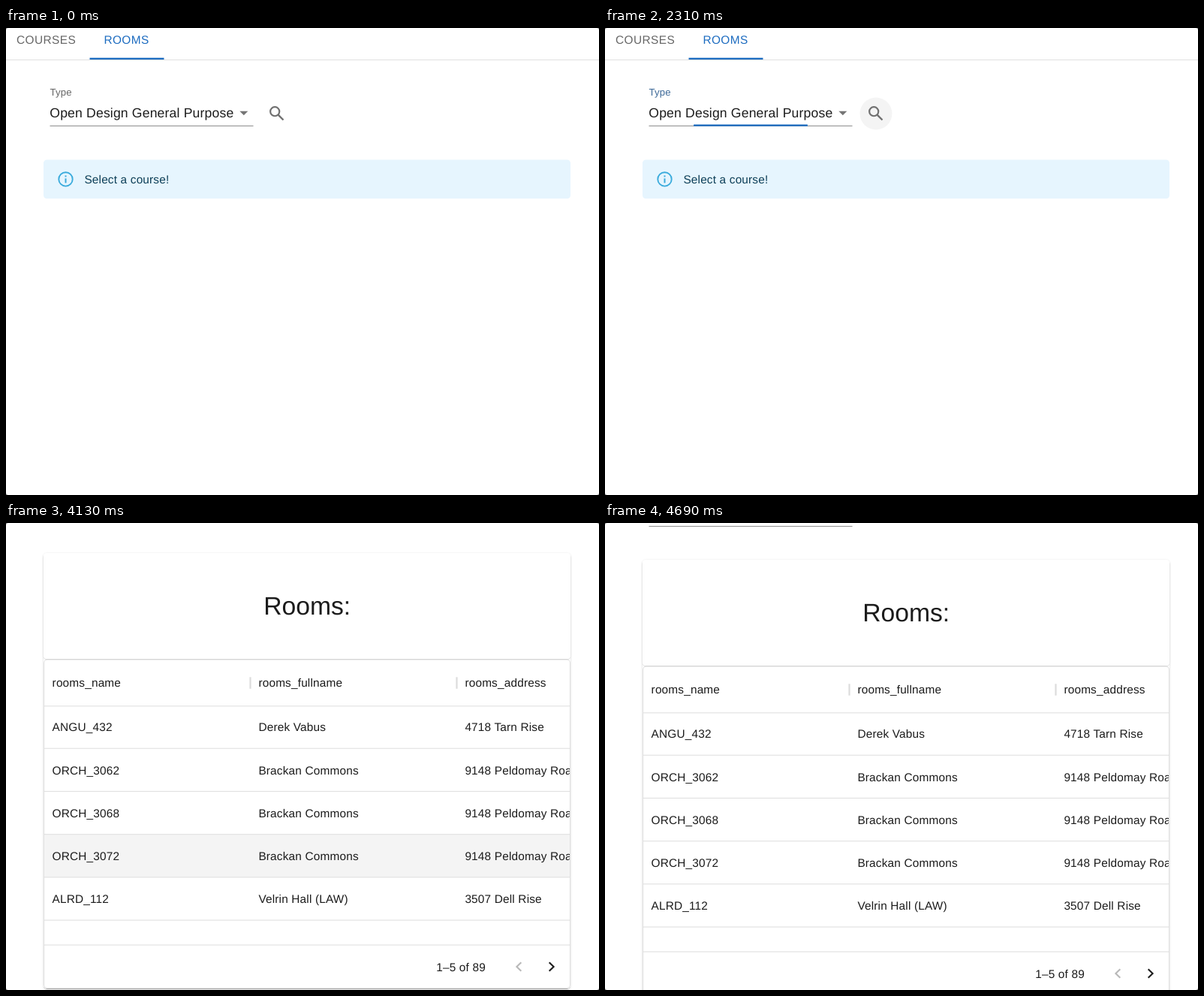
Animation, 790 px wide and 622 px high, one loop 5.04 s. Source, as an HTML page with a canvas:

```html
<!DOCTYPE html>
<html lang="en">
<head>
<meta charset="utf-8">
<title>Rooms</title>
<style>
  html, body { margin: 0; width: 100%; height: 100%; overflow: hidden; background: #fff; }
  canvas { display: block; }
</style>
</head>
<body>
<canvas id="stage" width="790" height="622"></canvas>
<script>
const ctx = document.getElementById('stage').getContext('2d');
const W = 790, H = 622, LOOP = 5040, STEP = 70;
const BLUE = [29, 108, 192], GREY = [102, 102, 102], INK = '#1c1c1c', LINE = '#e0e0e0';
const LEFT = 50, RIGHT = 752, COLUMNS = [61.6, 336.4, 611.4];
const HEADERS = ['rooms_name', 'rooms_fullname', 'rooms_address'];
const ROOMS = [
  ['ANGU_432', 'Derek Vabus', '4718 Tarn Rise'],
  ['ORCH_3062', 'Brackan Commons', '9148 Peldomay Road'],
  ['ORCH_3068', 'Brackan Commons', '9148 Peldomay Road'],
  ['ORCH_3072', 'Brackan Commons', '9148 Peldomay Road'],
  ['ALRD_112', 'Velrin Hall (LAW)', '3507 Dell Rise']
];

const clamp = v => Math.max(0, Math.min(1, v));
const rgb = c => `rgb(${c.join()})`;
const mix = (a, b, k) => rgb(a.map((v, i) => Math.round(v + (b[i] - v) * k)));
const rowLine = i => i ? 378 + 57.2 * i : 378.8;

function text(str, x, y, size = 15.4, color = INK, spacing = 0.0107) {
  ctx.font = `${size}px "Liberation Sans", Arial, sans-serif`;
  ctx.letterSpacing = `${size * spacing}px`;
  ctx.fillStyle = color;
  ctx.fillText(str, x, y);
}

function box(x, y, w, h, color) {
  ctx.fillStyle = color;
  ctx.fillRect(x, y, w, h);
}

function disc(x, y, r, color) {
  ctx.fillStyle = color;
  ctx.beginPath();
  ctx.arc(x, y, r, 0, 7);
  ctx.fill();
}

function ring(x, y, r, width, color) {
  ctx.strokeStyle = color;
  ctx.lineWidth = width;
  ctx.beginPath();
  ctx.arc(x, y, r, 0, 7);
  ctx.stroke();
}

function polyline(points, width, color) {
  ctx.strokeStyle = color;
  ctx.lineWidth = width;
  ctx.beginPath();
  points.forEach(p => ctx.lineTo(...p));
  ctx.stroke();
}

function rounded(x, y, w, h, r, color) {
  ctx.fillStyle = color;
  ctx.beginPath();
  ctx.roundRect(x, y, w, h, r);
  ctx.fill();
}

function paper(top, bottom, strength) {
  const shadows = [[2.2, 1.1, 0.2, 1.1], [1.1, 1.1, 0.14, 0], [1.1, 3.3, 0.12, 0]];
  for (const [dy, blur, alpha, inset] of shadows) {
    ctx.save();
    ctx.shadowColor = `rgba(0,0,0,${alpha * strength})`;
    ctx.shadowOffsetY = dy;
    ctx.shadowBlur = blur;
    rounded(LEFT + inset, top + inset, RIGHT - LEFT - 2 * inset, bottom - top - 2 * inset, 4.4, '#fff');
    ctx.restore();
  }
  rounded(LEFT, top, RIGHT - LEFT, bottom - top, 4.4, '#fff');
}

function scrollAt(t) {
  if (t < 4060) return 0;
  if (t < 4130) return 80;
  const settle = 9 * (1 - clamp((t - 4130) / 560)) ** 1.3;
  return 126 + Math.round(settle * 2) / 2;
}

function focusAt(t) {
  if (t < 1960) return 0;
  if (t < 2030) return 0.6;
  if (t < 2310) return 1;
  return [0.56, 0.12][Math.floor((t - 2310) / STEP)] || 0;
}

function hoveredRow(t) {
  if (t >= 2940 && t < 3010) return 1;
  if (t >= 3010 && t < 3080) return 3;
  if (t >= 3780 && t < 4270) return 3;
  return -1;
}

function drawTabs() {
  text('COURSES', 14, 21, 15.4, rgb(GREY), 0.0286);
  text('ROOMS', 130.4, 21, 15.4, rgb(BLUE), 0.0286);
  box(0, 42, W, 1, LINE);
  box(111.5, 39.7, 99, 2.3, rgb(BLUE));
}

function drawSelect(t) {
  const focus = focusAt(t);
  text('Type', 58.6, 90.3, 13.2, mix(GREY, BLUE, focus), 0.0094);
  text('Open Design General Purpose', 58.3, 119, 17.6, INK, 0.0094);
  ctx.fillStyle = '#757575';
  ctx.beginPath();
  ctx.moveTo(311.3, 110.8);
  ctx.lineTo(322.3, 110.8);
  ctx.lineTo(316.8, 116.3);
  ctx.fill();
  box(58.5, 129.9, 271, 1.1, '#949494');
  box(194 - 135.5 * focus, 128.5, 271 * focus, 2.3, rgb(BLUE));
}

function drawSearch(t) {
  const x = 361, y = 114, r = 21.5;
  const hover = t < 2310 ? 0 : 1 - clamp((t - 2870) / 200);
  disc(x, y, r, `rgba(0,0,0,${0.044 * hover})`);
  const press = clamp((t - 2310) / 490);
  if (press > 0 && press < 1) {
    disc(x, y, r * Math.sqrt(press), `rgba(0,0,0,${0.14 * (1 - press)})`);
  }
  ring(358.2, 111.2, 6.05, 2.2, '#707070');
  polyline([[362.6, 115.6], [369.5, 122.5]], 2.4, '#707070');
}

function drawNotice() {
  const blue = '#3aabdc';
  rounded(LEFT, 175.4, RIGHT - LEFT, 51.8, 4.4, '#e6f5fe');
  ring(79.5, 201.4, 9.2, 1.9, blue);
  box(78.5, 196.4, 2, 2, blue);
  box(78.5, 200.4, 2, 6, blue);
  text('Select a course!', 104.4, 207.2, 15.4, '#0d3f58');
}

function drawTable(t) {
  paper(175, 755, 1);
  paper(175, 316, 0.6);
  rounded(50.6, 317, 700.9, 437.5, 4.4, '#fff');
  ctx.strokeStyle = LINE;
  ctx.lineWidth = 1.1;
  ctx.stroke();
  ctx.textAlign = 'center';
  text('Rooms:', 401.2, 257, 33.7, INK, 0);
  ctx.textAlign = 'left';

  ctx.save();
  ctx.beginPath();
  ctx.rect(51, 317, 700, 440);
  ctx.clip();
  const hovered = hoveredRow(t);
  if (hovered >= 0) box(51, rowLine(hovered), 700, 57.2, '#f4f4f4');
  HEADERS.forEach((label, i) => {
    text(label, COLUMNS[i], 353.3);
    if (i) box(COLUMNS[i] - 12, 340.3, 2.2, 15.4, '#dcdcdc');
  });
  ROOMS.forEach((room, r) => {
    room.forEach((cell, c) => text(cell, COLUMNS[c], 412.3 + 57.2 * r));
  });
  for (let i = 0; i <= ROOMS.length; i++) box(51, rowLine(i) - 0.5, 700, 1.1, LINE);
  box(51, 696.5, 700, 1.1, LINE);
  text('1–5 of 89', 573.2, 732);
  polyline([[686.3, 720.2], [680.4, 726], [686.3, 731.8]], 2.1, '#b8b8b8');
  polyline([[723.7, 720.2], [729.6, 726], [723.7, 731.8]], 2.1, INK);
  ctx.restore();
}

function drawCorners() {
  ctx.fillStyle = '#777';
  ctx.beginPath();
  ctx.rect(0, 0, W, H);
  ctx.roundRect(0, 0, W, H, 3);
  ctx.fill('evenodd');
}

function draw(t) {
  box(0, 0, W, H, '#fff');
  ctx.save();
  ctx.translate(0, -scrollAt(t));
  drawTabs();
  drawSelect(t);
  drawSearch(t);
  if (t < 2450) drawNotice();
  else drawTable(t);
  ctx.restore();
  drawCorners();
}

ctx.textRendering = 'geometricPrecision';
const start = performance.now();
function tick() {
  const t = (performance.now() - start) % LOOP;
  draw(Math.floor(t / STEP) * STEP);
  requestAnimationFrame(tick);
}
tick();
</script>
</body>
</html>
```
